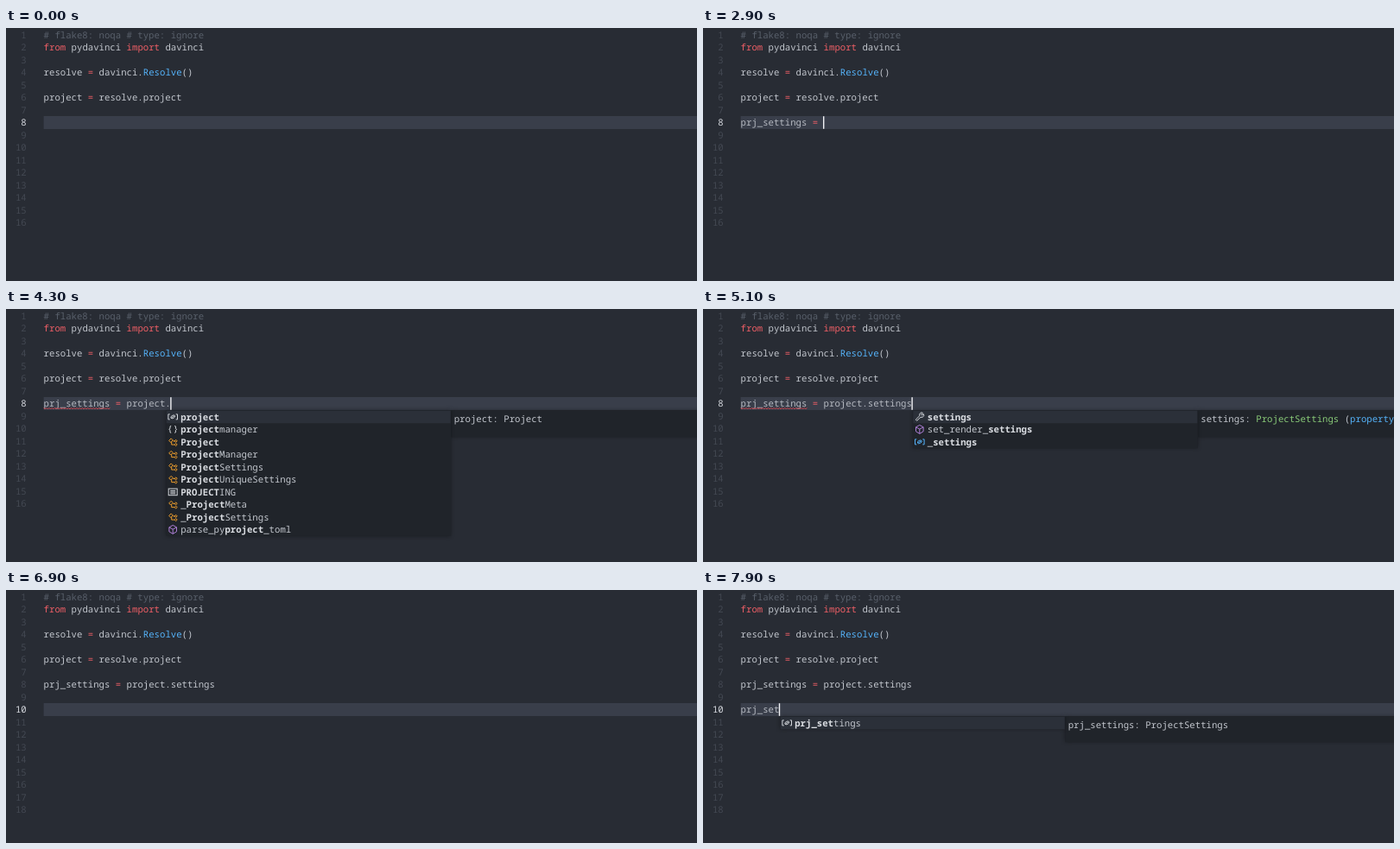
These frames come from a looping animation (800x293 px, 8 s). An HTML page with a canvas:

```html
<!DOCTYPE html>
<html lang="en">
<head>
<meta charset="utf-8">
<title>Editor completion</title>
<style>
html, body { margin: 0; width: 100%; height: 100%; overflow: hidden; background: #282c34; }
canvas { display: block; }
</style>
</head>
<body>
<canvas id="stage" width="800" height="293"></canvas>
<script>
const ctx = document.getElementById('stage').getContext('2d');
const LOOP = 8000, LEAD = 15;
const LEFT = 43.6, CHAR = 6.4, PITCH = 14.5, LIST_WIDTH = 330;
const C = {
  bg: '#282c34', line: '#393e4a', panel: '#20242a', chosen: '#2b3039', text: '#c3c7ce',
  typed: '#b5b9c1', comment: '#59606b', number: '#434852', active: '#d5d8de', red: '#ef5f66',
  blue: '#55b3fa', green: '#89ca78', gray: '#8c929c', purple: '#ad7fd6', orange: '#eb9c2c',
  white: '#d2d5da'
};

const code = [
  [1, [['# flake8: noqa # type: ignore', C.comment]]],
  [2, [['from', C.red], [' pydavinci '], ['import', C.red], [' davinci']]],
  [4, [['resolve '], ['=', C.red], [' davinci.'], ['Resolve', C.blue], ['()']]],
  [6, [['project '], ['=', C.red], [' resolve.project']]]
];

// Each suggestion is "icon label"; asterisks surround the matched letters.
const parseDoc = {
  height: 48,
  lines: [[['Auto-import', C.gray]], [],
    [['from', C.red], [' pydantic '], ['import', C.red], [' parse_obj_as']]]
};
const projectDoc = { height: 31, lines: [[['project: Project']]] };
const settingsDoc = {
  height: 31,
  lines: [[['settings: '], ['ProjectSettings', C.green], [' ('], ['property', C.blue], [')']]]
};
const variableDoc = { height: 30, lines: [[['prj_settings: ProjectSettings']]] };

const parseItems = ['cube *par*se_ob*j_as*'];
const pItems = ['cube *p*arse_obj_as', 'keyword *p*ass', 'cube *p*ow', 'cube *p*rint',
  'variable *p*rj_settings', 'variable *p*roject', 'class *p*roperty', 'cube *p*ack',
  'cube *p*ack_into', 'variable *p*ackagePathMap', 'cube *p*ackages_distributions',
  'cube *p*ackages_distributions'];
const prItems = ['cube *pr*int', 'variable *pr*j_settings', 'variable *pr*oject',
  'class *pr*operty', 'cube *p*a*r*se_obj_as', 'class *Pr*oject', 'class *Pr*ojectManager',
  'class *Pr*ojectSettings', 'class *Pr*ojectUniqueSettings', 'text *PR*OJECTING',
  'class _*Pr*ojectMeta', 'class _*Pr*ojectSettings'];
const projectItems = n => {
  const hit = label => label.replace(/project/i, m => `*${m.slice(0, n)}*${m.slice(n)}`);
  return ['variable project', 'braces projectmanager', 'class Project', 'class ProjectManager',
    'class ProjectSettings', 'class ProjectUniqueSettings', 'text PROJECTING',
    'class _ProjectMeta', 'class _ProjectSettings', 'cube parse_pyproject_toml'].map(hit);
};
const memberItems = ['cube add_timeline', 'cube close', 'cube delete_render_job',
  'cube load_render_preset', 'wrench name', 'cube open', 'cube render_formats', 'cube save',
  'cube set_render_settings', 'wrench settings', 'wrench timeline', 'wrench timeline_count'];
const sItems = ['cube *s*ave', 'wrench *s*ettings', 'cube *s*et_name', 'cube *s*et_preset',
  'cube *s*et_render_format', 'cube *s*et_render_settings', 'cube *s*et_timeline',
  'variable _*s*ettings'];
const settingsItems = n => {
  const head = 'settings'.slice(0, n), tail = 'settings'.slice(n);
  return [`wrench *${head}*${tail}`, `cube set_render_*${head}*${tail}`,
    `variable _*${head}*${tail}`];
};
const prjItems = n => [`variable *${'prj_settings'.slice(0, n)}*${'prj_settings'.slice(n)}`];

// Steps: start, edited line, its text, suggestions, documentation, column of a lagging list.
const base = 'prj_settings = ', full = base + 'project.settings';
const steps = [
  [0, 8, ''], [1400, 8, 'p'], [1500, 8, 'pr'], [1600, 8, 'prj', ['cube *par*se_ob*j*_as'], parseDoc],
  [1900, 8, 'prj_s', parseItems, parseDoc]
];
for (let n = 6; n <= 12; n++) steps.push([1400 + n * 100, 8, base.slice(0, n)]);
steps.push([2700, 8, base.slice(0, 13)], [2800, 8, base.slice(0, 14)], [2900, 8, base],
  [3600, 8, base + 'p', pItems],
  [3800, 8, base + 'pr', prItems],
  [3900, 8, base + 'pro', projectItems(3), projectDoc],
  [4000, 8, base + 'proj', projectItems(4), projectDoc],
  [4100, 8, base + 'projec', projectItems(6), projectDoc],
  [4200, 8, base + 'project', projectItems(7), projectDoc],
  [4300, 8, base + 'project.', projectItems(7), projectDoc, 22],
  [4400, 8, base + 'project.', memberItems],
  [4700, 8, full.slice(0, 24), sItems],
  [4900, 8, full.slice(0, 26), settingsItems(3), settingsDoc],
  [5000, 8, full.slice(0, 29), settingsItems(6), settingsDoc],
  [5100, 8, full, settingsItems(8), settingsDoc],
  [5500, 8, full], [5800, 9, ''], [6400, 10, ''],
  [7000, 10, 'p', pItems], [7200, 10, 'pr', prItems],
  [7400, 10, 'prj', prjItems(3), variableDoc], [7600, 10, 'prj_', prjItems(4), variableDoc],
  [7700, 10, 'prj_s', prjItems(5), variableDoc], [7800, 10, 'prj_se', prjItems(6), variableDoc],
  [7900, 10, 'prj_set', prjItems(7), variableDoc]);

const centre = n => 8 + (n - 1) * PITCH;

function rect(x, y, w, h, color) {
  ctx.fillStyle = color;
  ctx.fillRect(x, y, w, h);
}

function write(parts, x, y) {
  for (const [str, color = C.text, weight = 400] of parts) {
    ctx.font = `${weight} 10.667px "Noto Sans Mono", "DejaVu Sans Mono", monospace`;
    ctx.fillStyle = color;
    ctx.fillText(str, x, y + 3.7);
    x += str.length * CHAR;
  }
}

function assignment(str, color) {
  return str.split(/(=)/).map(s => [s, s === '=' ? C.red : color]);
}

function path(points, close) {
  ctx.beginPath();
  points.forEach(([x, y]) => ctx.lineTo(x, y));
  if (close) ctx.closePath();
  ctx.stroke();
}

const icons = {
  cube() {
    path([[0, -5], [4.3, -2.6], [4.3, 2.4], [0, 5], [-4.3, 2.4], [-4.3, -2.6]], true);
    path([[-4.3, -2.6], [0, -0.3], [4.3, -2.6]]);
    path([[0, -0.3], [0, 5]]);
  },
  variable() {
    path([[-3.5, -3], [-5.3, -3], [-5.3, 3], [-3.5, 3]]);
    path([[3.5, -3], [5.3, -3], [5.3, 3], [3.5, 3]]);
    ctx.beginPath();
    ctx.ellipse(0, 0, 2.6, 1.6, -0.5, 0, Math.PI * 2);
    ctx.stroke();
    path([[-1.6, 1], [1.6, -1]]);
  },
  class() {
    path([[-4.5, -1.5], [-2, -4], [0, -2], [-2.5, 0.6]], true);
    path([[0, -1], [3, -1]]);
    path([[-1.5, 0], [-1.5, 3.2], [2, 3.2]]);
    path([[2, -1], [3.6, -2.5], [5, -1], [3.4, 0.5]], true);
    path([[2, 3.2], [3.6, 1.7], [5, 3.2], [3.4, 4.7]], true);
  },
  keyword() {
    [[-5, 1], [-5, 5], [-5, 2], [-5, 5]].forEach(([a, b], i) => path([[a, i * 2.6 - 4], [b, i * 2.6 - 4]]));
    path([[3, -4], [5, -4]]);
    path([[3.5, 1.2], [5, 1.2]]);
  },
  text() {
    ctx.strokeRect(-5, -3.8, 10, 7.6);
    [-1.5, 0.2, 1.9].forEach(y => path([[-3, y], [3, y]]));
  },
  braces() {
    for (const s of [-1, 1]) {
      path([[s * 2, -4], [s * 3.2, -3.5], [s * 3.2, -1], [s * 4.5, 0], [s * 3.2, 1], [s * 3.2, 3.5], [s * 2, 4]]);
    }
  },
  wrench() {
    path([[-4.5, 3.2], [0, -1.2], [0, -3.5], [2, -5], [3.5, -4.6], [1.9, -2.8], [2.8, -1.8],
      [4.5, -3.3], [5, -1.5], [3.5, 0.4], [1.2, 0.4], [-3.2, 4.5]], true);
  }
};
const iconColors = { cube: C.purple, variable: C.blue, class: C.orange };

function drawIcon(name, x, y, chosen) {
  ctx.save();
  ctx.translate(x, y);
  ctx.strokeStyle = chosen ? C.white : iconColors[name] || C.white;
  ctx.lineWidth = 1;
  icons[name]();
  ctx.restore();
}

function panel(x, y, w, h) {
  ctx.save();
  ctx.shadowColor = 'rgba(0,0,0,.4)';
  ctx.shadowBlur = 5;
  rect(x, y, w, h, C.panel);
  ctx.restore();
}

function drawPopup(x, y, items, doc) {
  if (doc) {
    panel(x + LIST_WIDTH, y, 430, doc.height);
    doc.lines.forEach((parts, i) => write(parts, x + LIST_WIDTH + 3.5, y + 10.3 + i * 13.4));
  }
  panel(x, y, LIST_WIDTH, items.length * PITCH + 0.5);
  rect(x + 0.5, y + 0.5, LIST_WIDTH - 1, PITCH, C.chosen);
  items.forEach((item, i) => {
    const [icon, label] = item.split(' ');
    const rowY = y + 7.6 + i * PITCH;
    drawIcon(icon, x + 8, rowY, i === 0);
    const parts = label.split('*').map((s, k) => [s, k % 2 ? '#dadde2' : C.text, k % 2 ? 700 : 400]);
    write(parts, x + 17, rowY);
  });
}

function squiggle(x, y, width) {
  ctx.strokeStyle = '#d9434d';
  ctx.lineWidth = 0.9;
  const points = [];
  for (let d = 0; d <= width; d += 1.6) points.push([x + d, y + (points.length % 2 ? 0.8 : -0.8)]);
  path(points);
}

function draw(t) {
  const [, line, text, items, doc, listCol] = steps.filter(s => s[0] <= t).pop();
  const y = centre(line), cursor = LEFT + text.length * CHAR;

  rect(0, 0, 800, 293, C.bg);
  rect(LEFT, y - 7.5, 800, 15, C.line);
  ctx.textAlign = 'right';
  for (let n = 1; n <= line + 8; n++) {
    write([[String(n), n === line ? C.active : C.number]], 23.7, centre(n));
  }
  ctx.textAlign = 'left';
  for (const [n, parts] of code) write(parts, LEFT, centre(n));
  if (line > 8) write(assignment(full), LEFT, centre(8));
  write(assignment(text, C.typed), LEFT, y);

  if (t >= 3100 && t < 5800) squiggle(LEFT, 115.2, 12 * CHAR);
  if (items) drawPopup(LEFT + (listCol || text.length) * CHAR + 0.8, y + 7.8, items, doc);
  if (text) rect(cursor - 0.6, y - 7.3, 1.4, 14.6, '#f0f1f4');
}

ctx.textRendering = 'geometricPrecision';
const start = performance.now();
function tick() {
  draw((performance.now() - start + LEAD) % LOOP);
  requestAnimationFrame(tick);
}
tick();
</script>
</body>
</html>
```
